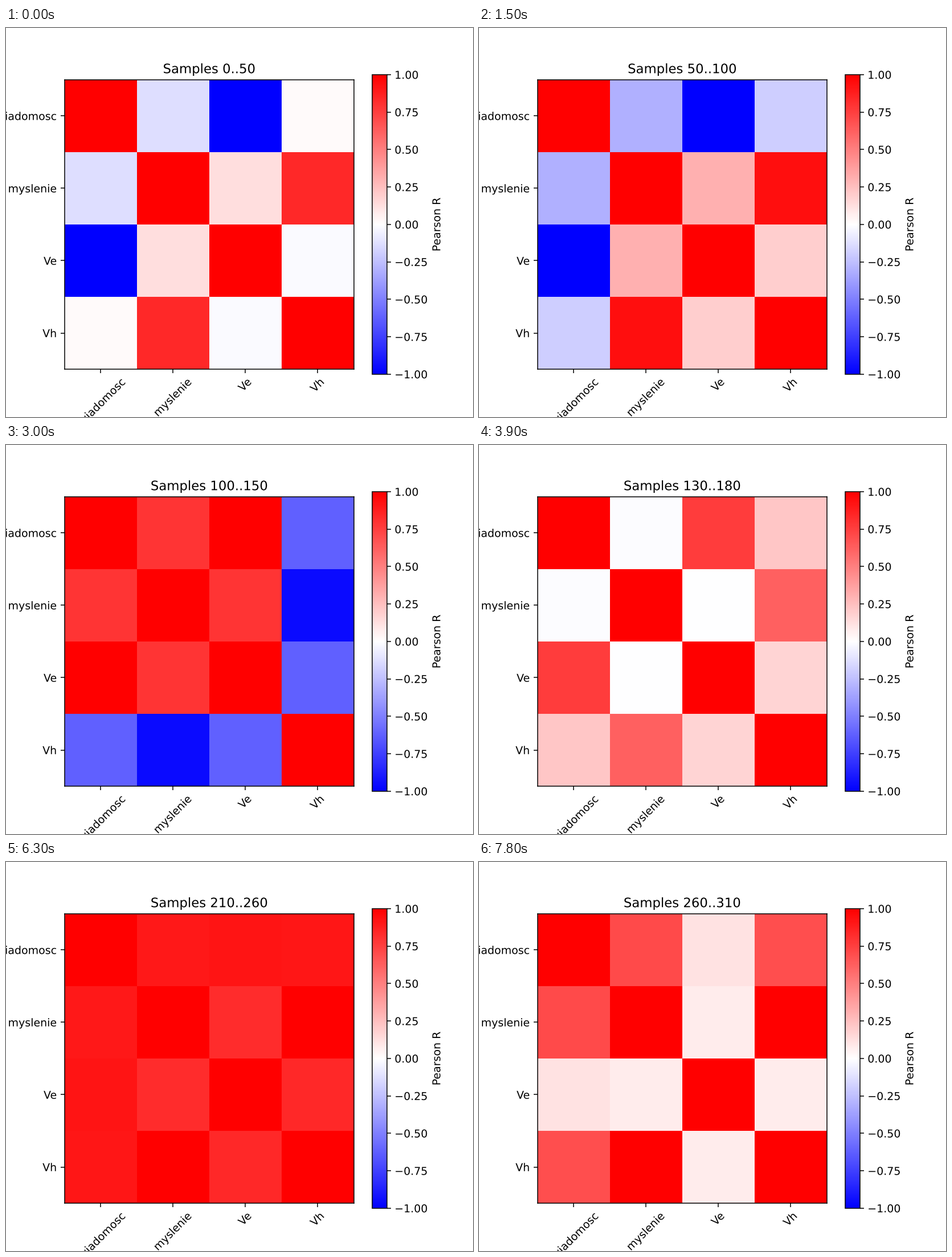
A matplotlib script that plays this animation: 820x683 px, repeating every 8 s.

```python
import matplotlib.pyplot as plt
import numpy as np
from matplotlib.animation import FuncAnimation
from matplotlib.patheffects import Normal

WIDTH, HEIGHT = 820, 683
DPI = WIDTH / 6
INTERVAL, TICKS = 100, 80   # one loop is 8000 ms
HOLD = 3                    # ticks per window position
WINDOW, STRIDE = 50, 10
LABELS = ["swiadomosc", "myslenie", "Ve", "Vh"]
COUNT = len(LABELS)

# Key points of the independent correlations along the window start
STARTS = [0, 50, 100, 130, 160, 210, 260]
AWARE_THINK = [-0.13, -0.31, 0.79, -0.01, 0.32, 0.90, 0.71]
AWARE_VE = [-1, -1, 1, 0.76, 0.98, 0.92, 0.11]
AWARE_VH = [0.02, -0.19, -0.62, 0.22, 0.31, 0.91, 0.69]
THINK_VH = [0.84, 0.94, -0.96, 0.62, 0.98, 1, 1]


def correlation_matrix(start):
    aware_think, aware_ve, aware_vh, think_vh = (
        np.interp(start, STARTS, curve)
        for curve in (AWARE_THINK, AWARE_VE, AWARE_VH, THINK_VH))
    # Ve follows the first signal, so its other links are products
    upper = np.zeros((COUNT, COUNT))
    upper[0, 1:] = aware_think, aware_ve, aware_vh
    upper[1, 2:] = aware_ve * aware_think, think_vh
    upper[2, 3] = aware_ve * aware_vh
    return upper + upper.T + np.eye(COUNT)


plt.rcParams["text.hinting"] = "none"

# The small margin keeps the pixel size from being truncated
fig, ax = plt.subplots(
    figsize=((WIDTH + 0.01) / DPI, (HEIGHT + 0.01) / DPI), dpi=DPI)
edges = np.arange(COUNT + 1) - 0.5
mesh = ax.pcolormesh(edges, edges, correlation_matrix(0),
                     cmap="bwr", vmin=-1, vmax=1)
ax.set_aspect("equal")
ax.invert_yaxis()
ax.set_xticks(range(COUNT), LABELS, rotation=45)
ax.set_yticks(range(COUNT), LABELS)
title = ax.set_title("Samples")
fig.colorbar(mesh, ax=ax, label="Pearson R")

# Outlined text keeps its fractional pixel position
fig.draw_without_rendering()
for text in fig.findobj(plt.Text):
    text.set_path_effects([Normal()])


def update(tick):
    start = tick // HOLD * STRIDE
    mesh.set_array(correlation_matrix(start))
    title.set_text(f"Samples {start}..{start + WINDOW}")
    return mesh, title


animation = FuncAnimation(fig, update, frames=TICKS, interval=INTERVAL,
                          repeat=True, repeat_delay=0)
plt.show()
```
